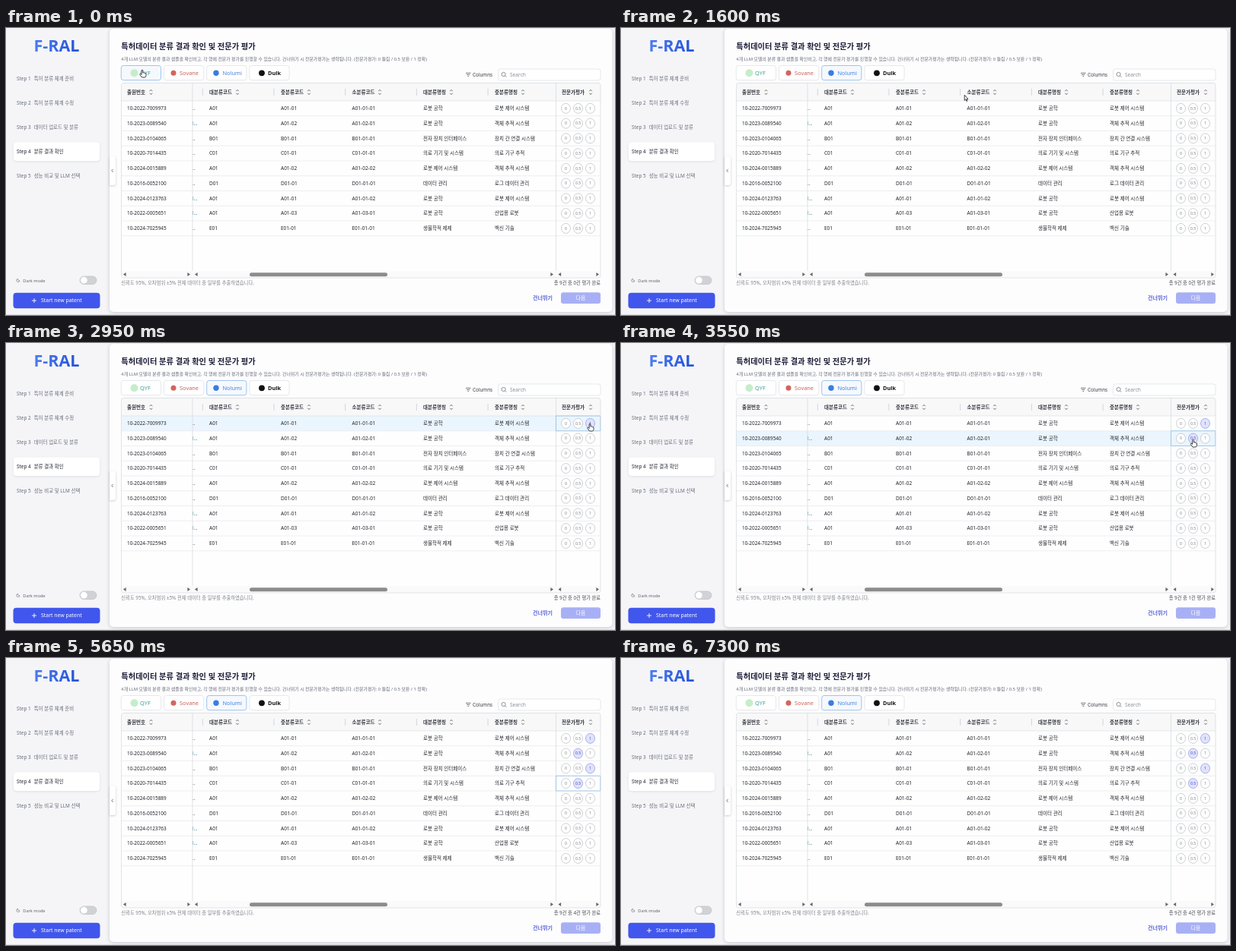
An HTML page with a canvas for the animation above (7350 ms loop, 800 px wide and 378 px high).

```html
<!DOCTYPE html>
<html lang="ko">
<head>
<meta charset="utf-8">
<title>특허데이터 분류 결과</title>
<style>
html, body { margin: 0; width: 100%; height: 100%; overflow: hidden; background: #f5f5f8; }
canvas { display: block; width: 800px; height: 378px; }
</style>
</head>
<body>
<canvas id="stage"></canvas>
<script>
const LOOP = 7350, W = 800, H = 378;
const ROW_TOP = 96, ROW_H = 19.75;
const FONT = '"Noto Sans", "Noto Sans CJK KR", "Noto Sans CJK JP", "Noto Sans CJK SC", sans-serif';
const canvas = document.getElementById('stage');
const ctx = canvas.getContext('2d');
const scale = Math.max(1, window.devicePixelRatio || 1);
canvas.width = W * scale;
canvas.height = H * scale;

const steps = ['특허 분류 체계 준비', '특허 분류 체계 수정', '데이터 업로드 및 분류', '분류 결과 확인', '성능 비교 및 LLM 선택'];
const tabs = [
  { name: 'QYF', color: '#3f9f98', dot: '#c5edc9', r: 5, x: 168.5, tx: 176 },
  { name: 'Sovane', color: '#c9605a', dot: '#d2655c', r: 3.5, x: 220, tx: 228 },
  { name: 'Nolumi', color: '#4381dc', dot: '#3a7de0', r: 3.7, x: 276, tx: 284.5 },
  { name: 'Dulk', color: '#161616', dot: '#111111', r: 3.9, x: 336, tx: 344 }
];
const columns = [
  ['출원번호', 159], ['대분류코드', 267], ['중분류코드', 361], ['소분류코드', 454.5],
  ['대분류명칭', 548], ['중분류명칭', 642], ['전문가평가', 730]
];
const sortX = [190.5, 304, 398, 491, 585, 679, 768];
const rows = [
  ['10-2022-7009973', 'A01-01-01', '로봇 공학', '로봇 제어 시스템', '..'],
  ['10-2023-0089540', 'A01-02-01', '로봇 공학', '객체 추적 시스템', 'l...'],
  ['10-2023-0104065', 'B01-01-01', '전자 장치 인터페이스', '장치 간 연결 시스템', '..'],
  ['10-2020-7014435', 'C01-01-01', '의료 기기 및 시스템', '의료 기구 추적', '..'],
  ['10-2024-0015889', 'A01-02-02', '로봇 제어 시스템', '객체 추적 시스템', '..'],
  ['10-2016-0052100', 'D01-01-01', '데이터 관리', '로그 데이터 관리', '..'],
  ['10-2024-0123763', 'A01-01-02', '로봇 공학', '로봇 제어 시스템', 'l...'],
  ['10-2022-0005651', 'A01-03-01', '로봇 공학', '산업용 로봇', 'l...'],
  ['10-2024-7025945', 'E01-01-01', '생물학적 제제', '백신 기술', '..']
];
const scores = ['0', '0.5', '1'];
const scoreX = [735.5, 751.5, 767.5];
// time, row, score index
const clicks = [[2950, 0, 2], [3500, 1, 1], [4080, 2, 2], [4560, 3, 1]];
// time, x, y of the pointer tip
const path = [
  [0, 179, 55], [250, 179, 55], [480, 238, 58], [650, 240, 58], [850, 300, 62], [1250, 300, 62],
  [2200, 790, 147], [2450, 790, 147], [2880, 767, 106], [3080, 767, 106], [3420, 751.5, 127],
  [3650, 751.5, 127], [4000, 767, 146], [4150, 767, 146], [4500, 755.3, 165],
  [4750, 755.3, 165], [5250, 705, 12]
];
const POINTER_END = 5300, BLUR = 7000;

function text(s, x, y, size, color, weight = 400, align = 'left') {
  ctx.font = `${weight} ${size}px ${FONT}`;
  ctx.textAlign = align;
  ctx.fillStyle = color;
  ctx.fillText(s, x, y + size * 0.36);
}

function box(x, y, w, h, r, fill, stroke, lw = 0.7) {
  ctx.beginPath();
  ctx.roundRect(x, y, w, h, r);
  if (fill) { ctx.fillStyle = fill; ctx.fill(); }
  if (stroke) { ctx.strokeStyle = stroke; ctx.lineWidth = lw; ctx.stroke(); }
}

function raised(x, y, w, h, r, blur, alpha, fill = '#fff') {
  ctx.save();
  ctx.shadowColor = `rgba(50,55,80,${alpha})`;
  ctx.shadowBlur = blur * scale;
  ctx.shadowOffsetY = scale;
  box(x, y, w, h, r, fill);
  ctx.restore();
}

function oval(x, y, rx, ry, fill, stroke, lw = 0.7) {
  ctx.beginPath();
  ctx.ellipse(x, y, rx, ry, 0, 0, Math.PI * 2);
  if (fill) { ctx.fillStyle = fill; ctx.fill(); }
  if (stroke) { ctx.strokeStyle = stroke; ctx.lineWidth = lw; ctx.stroke(); }
}

function line(points, color, lw = 0.7) {
  ctx.beginPath();
  points.forEach(([x, y], i) => i ? ctx.lineTo(x, y) : ctx.moveTo(x, y));
  ctx.strokeStyle = color;
  ctx.lineWidth = lw;
  ctx.stroke();
}

function triangle(x, y, dir) {
  ctx.beginPath();
  ctx.moveTo(x + 2 * dir, y);
  ctx.lineTo(x - 1.6 * dir, y - 2.6);
  ctx.lineTo(x - 1.6 * dir, y + 2.6);
  ctx.fillStyle = '#666';
  ctx.fill();
}

function drawSidebar() {
  const g = ctx.createLinearGradient(37, 0, 97, 0);
  g.addColorStop(0, '#4b7cf0');
  g.addColorStop(1, '#2450d6');
  text('F-RAL', 66.5, 23.3, 21.5, g, 700, 'center');
  raised(10, 150.5, 113, 24.5, 4, 3, 0.12);
  steps.forEach((label, i) => {
    const y = 67 + i * 31.9, on = i === 3;
    const color = on ? '#23252f' : '#686d7b', weight = on ? 500 : 400;
    text('Step ' + (i + 1), 14, y, 6.4, color, weight);
    text(label, 36.7, y, 6.45, color, weight);
  });
  ctx.beginPath();
  ctx.arc(16, 332.3, 2.2, -1.9, 3.4, true);
  ctx.arc(16, 332.3, 2.2, 3.4, 0.3, true);
  ctx.quadraticCurveTo(15.2, 332.6, 15.3, 330.2);
  ctx.strokeStyle = '#666';
  ctx.lineWidth = 0.6;
  ctx.stroke();
  text('Dark mode', 22.3, 332.5, 5.6, '#62656e');
  box(97, 327, 22, 10.5, 5.2, '#d0d2d6', '#bfc1c6');
  oval(102.4, 332.2, 4.7, 4.7, '#fff', '#c4c6ca', 0.5);
  box(9.5, 348.8, 114, 20.4, 4, '#4156ec');
  line([[34, 359], [40, 359]], '#fff', 0.9);
  line([[37, 356], [37, 362]], '#fff', 0.9);
  text('Start new patent', 46, 359, 6.9, '#fff', 500);
}

function drawTop(active) {
  text('특허데이터 분류 결과 확인 및 전문가 평가', 151.3, 24, 10.25, '#1d1d38', 700);
  text('4개 LLM 모델의 분류 결과 샘플을 확인하고, 각 행에 전문가 평가를 진행할 수 있습니다. 건너뛰기 시 전문가평가는 생략됩니다. (전문가평가: 0 틀림 / 0.5 보완 / 1 정확)',
    151.3, 40.5, 5.87, '#666a77');
  tabs.forEach((tab, i) => {
    const on = i === active;
    box(151.3 + i * 56.2, 49.5, 52.2, 19.2, 3, on ? '#f5f9fe' : '#fff', on ? '#78aee6' : '#dddfe4');
    oval(tab.x, 59.3, tab.r, tab.r, tab.dot);
    text(tab.name, tab.tx, 59.2, 7.4, tab.color, i === 3 ? 600 : 500);
  });
  [[604, 610.5], [605.2, 609.3], [606.4, 608.1]].forEach(([a, b], i) =>
    line([[a, 59.4 + i * 2.1], [b, 59.4 + i * 2.1]], '#555', 0.8));
  text('Columns', 613, 61.5, 6.3, '#3c3e45');
  box(646.5, 54, 134.5, 15, 3, '#fff', '#dcdee3');
  oval(653.6, 61, 2.6, 2.6, null, '#666');
  line([[655.5, 62.9], [657.4, 64.8]], '#666');
  text('Search', 662, 61.5, 6.6, '#8b8e96');
}

function drawTable(t, hover) {
  box(151.5, 72.5, 629.5, 256.5, 3, '#fefefe');
  box(151.5, 72.5, 629.5, 23.5, [3, 3, 0, 0], '#f8f8f9');
  columns.forEach(([label, x], i) => {
    text(label, x, 84.5, 6.5, '#34363e', 700);
    const s = sortX[i];
    line([[s - 1.7, 83.2], [s, 81.4], [s + 1.7, 83.2]], '#444', 0.8);
    line([[s - 1.7, 85.8], [s, 87.6], [s + 1.7, 85.8]], '#444', 0.8);
  });
  for (let i = 0; i < 5; i++) {
    const x = 258.3 + i * 93.7;
    line([[x, 80], [x, 89]], '#c6c8cc');
  }
  if (hover >= 0) box(151.8, ROW_TOP + hover * ROW_H, 629, ROW_H, 0, '#ebf5fd');

  const done = clicks.filter(c => t >= c[0]);
  const longName = t >= 600 && t < 1000;
  rows.forEach(([id, code, big, mid, clip], i) => {
    const y = ROW_TOP + (i + 0.5) * ROW_H;
    const color = '#22242b';
    text(id, 159, y, 6.4, color);
    text(clip, 244.9, y, 6.2, clip[0] === 'l' ? '#2b7f92' : '#444');
    text(code.slice(0, 3), 267, y, 6.5, color);
    text(code.slice(0, 6), 361, y, 6.5, color);
    text(code, 454.5, y, 6.5, color);
    text(i === 4 && longName ? '로봇의 구조, 움직임, 제어 ...' : big, 548, y, 6.5, color);
    text(mid, 642, y, 6.5, color);
    scores.forEach((s, k) => {
      const on = done.some(c => c[1] === i && c[2] === k);
      oval(scoreX[k], y, 6, 6.5, on ? '#e1e3fb' : '#fff', on ? '#858bdd' : '#b4b6bb', 0.65);
      text(s, scoreX[k], y, 5.1, on ? '#4148bd' : '#7b7d84', on ? 500 : 400, 'center');
    });
  });
  for (let i = 0; i <= rows.length; i++) {
    const y = ROW_TOP + i * ROW_H;
    line([[151.5, y], [781, y]], i ? '#e8e9ec' : '#dcdee2');
  }
  for (const x of [245, 722.5]) line([[x, 72.5], [x, 329]], '#d5d7dc');
  if (done.length && t < BLUR) {
    const y = ROW_TOP + done[done.length - 1][1] * ROW_H;
    box(722.5, y, 58.3, ROW_H, 0, null, '#83b9e3', 0.7);
  }
  box(151.8, 320, 629, 8.7, [0, 0, 3, 3], '#fafafa');
  for (const x of [156, 250, 727.5]) triangle(x, 324.5, -1);
  for (const x of [240, 717, 777]) triangle(x, 324.5, 1);
  box(320, 322.2, 181, 5, 2.5, '#8c8c8c');
  box(151.5, 72.5, 629.5, 256.5, 3, null, '#d6d8dd');
}

function drawFooter(t) {
  const count = clicks.filter(c => t >= c[0] + 80).length;
  text('신뢰도 95%, 오차범위 ±5% 전체 데이터 중 일부를 추출하였습니다.', 151.3, 336, 6.3, '#82848b');
  text(`총 9건 중 ${count}건 평가 완료`, 781, 336, 6.25, '#484a52', 400, 'right');
  text('건너뛰기', 705, 355.7, 7, '#5b64d8', 700, 'center');
  box(729, 348.3, 52, 14.7, 3, '#a8b0f5');
  text('다음', 755, 355.7, 6.8, '#fff', 500, 'center');
}

function pointerAt(t) {
  const i = path.findIndex(p => p[0] > t);
  if (i < 0) return path[path.length - 1].slice(1);
  const [t0, x0, y0] = path[i - 1], [t1, x1, y1] = path[i];
  const u = (t - t0) / (t1 - t0), e = u * u * (3 - 2 * u);
  return [x0 + (x1 - x0) * e, y0 + (y1 - y0) * e];
}

function drawPointer(x, y, hand) {
  ctx.save();
  ctx.translate(x, y);
  const shape = new Path2D(hand
    ? 'M-.9 .7Q0-.6 .9 .7V4Q1.9 3.2 2.5 4.3Q3.5 3.7 3.9 4.8Q5 4.5 5 5.8V7.5Q4.8 9.2 3.7 10H-.5L-3.3 6.3Q-3.2 4.8-1.8 5.6L-.9 6.5Z'
    : 'M0 0V7.2L1.6 5.7L2.7 8.2L3.8 7.7L2.7 5.3H4.7Z');
  ctx.lineJoin = 'round';
  ctx.lineWidth = 0.9;
  ctx.strokeStyle = '#2b2b30';
  ctx.fillStyle = '#fff';
  ctx.fill(shape);
  ctx.stroke(shape);
  ctx.restore();
}

function draw(t) {
  ctx.setTransform(scale, 0, 0, scale, 0, 0);
  ctx.fillStyle = '#f5f5f8';
  ctx.fillRect(0, 0, W, H);
  line([[0, 377.5], [W, 377.5]], '#d9dade');
  raised(136, 1, 660.5, 373, 5, 5, 0.25, '#fdfdfe');
  raised(136, 168.5, 8, 38.5, [0, 3, 3, 0], 3, 0.25);
  line([[140.6, 185.8], [138.8, 187.8], [140.6, 189.8]], '#555', 0.8);

  const [x, y] = pointerAt(t);
  const shown = t < POINTER_END;
  const row = Math.floor((y - ROW_TOP) / ROW_H);
  const inRow = shown && x > 151 && x < 781 && row >= 0 && row < rows.length;
  const onTab = x > 151 && x < 372 && y > 49 && y < 69;
  const onScore = inRow && scoreX.some(s => Math.abs(x - s) < 6);

  drawSidebar();
  drawTop(t < 540 ? 0 : t < 870 ? 1 : 2);
  drawTable(t, inRow ? row : -1);
  drawFooter(t);
  if (shown) drawPointer(x, y, onTab || onScore);
}

const start = performance.now();
function frame() {
  draw((performance.now() - start) % LOOP);
  requestAnimationFrame(frame);
}
frame();
</script>
</body>
</html>
```
